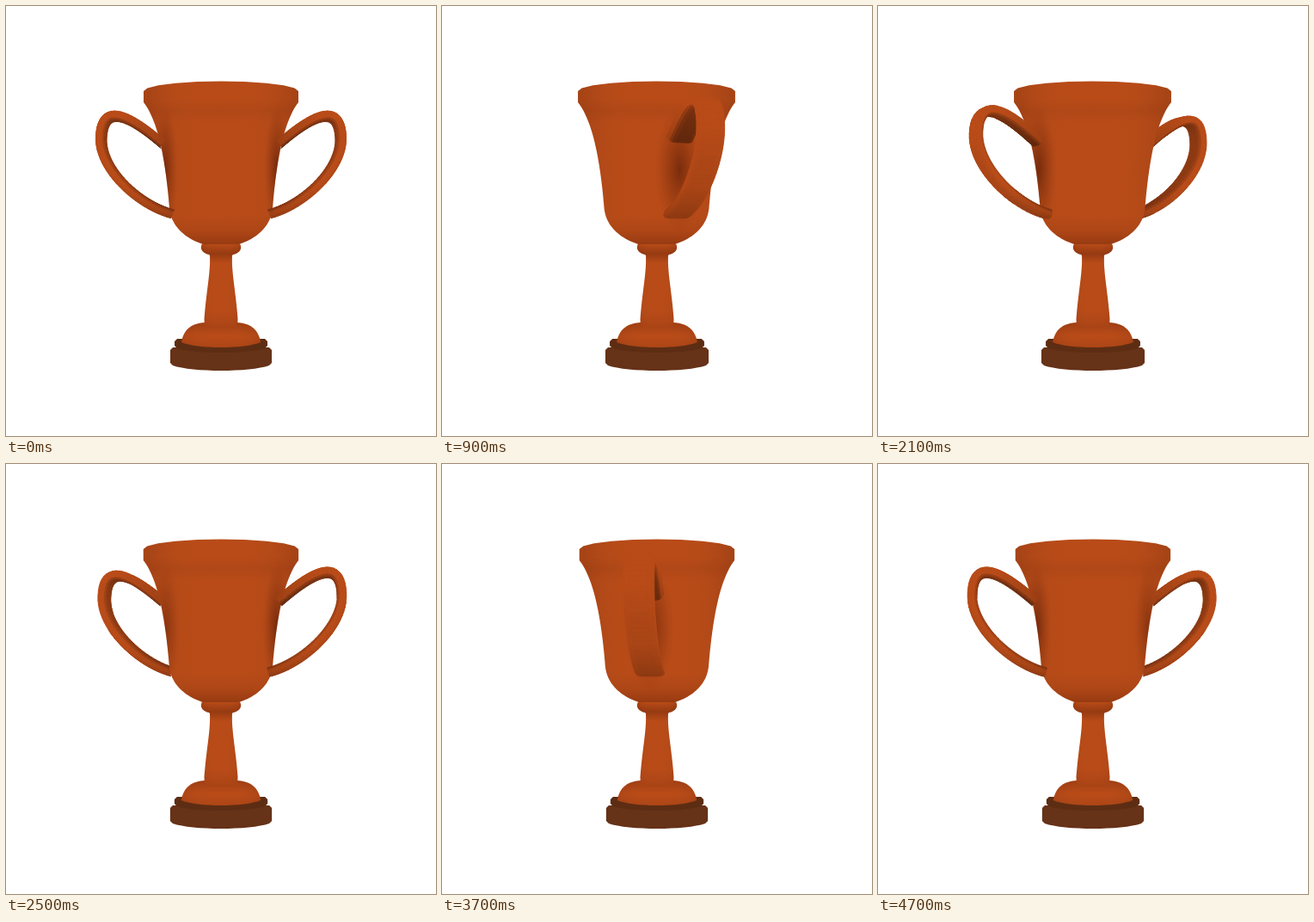
An HTML page with a canvas that plays this animation: 500 by 500 pixels, repeating every 4.8 s.

```html
<!DOCTYPE html>
<html lang="en">
<head>
<meta charset="utf-8">
<title>Rotating trophy</title>
<style>
  html, body { margin: 0; width: 100%; height: 100%; overflow: hidden; background: #fff; }
  canvas { display: block; width: 500px; height: 500px; }
</style>
</head>
<body>
<canvas id="stage" width="500" height="500"></canvas>
<script>
const ctx = document.getElementById('stage').getContext('2d');
const LOOP = 4800, STEP = 100, CENTER = 250, CAMERA = 980;
const ORANGE = [184, 75, 24];

const sample = (count, fn) => Array.from({ length: count + 1 }, (_, i) => fn(i / count));
const bezier = (a, b, c, d) => sample(24, t => [0, 1].map(k =>
  a[k] * (1 - t) ** 3 + 3 * b[k] * t * (1 - t) ** 2 + 3 * c[k] * t * t * (1 - t) + d[k] * t ** 3));

// Outlines as [distance from the axis, y], from top to bottom.
const RIM = sample(5, t => [90 * Math.sin(t * Math.PI / 2), 99 - 11.5 * Math.cos(t * Math.PI / 2)]);
const BOWL = [
  ...RIM,
  ...bezier([90, 112], [72, 135], [64, 185], [60, 235]),
  ...bezier([60, 235], [58, 256], [42, 270], [21, 277])
];
const STEM = [
  ...bezier([21, 276], [25, 279], [24, 287], [14, 289]),
  ...bezier([13, 290], [12, 310], [17, 330], [19.5, 364]),
  [19, 373]
];
const FOOT = bezier([19, 368], [36, 369], [44, 378], [46, 391]);
const HANDLE = [
  ...bezier([67, 161], [94, 138], [137, 105], [139, 153]),
  ...bezier([139, 153], [141, 190], [95, 232], [56, 242]).slice(1)
];

// Rounded handle cross-section as [across, outward], narrower on its inner side.
const SIDES = 12, HALF_WIDTH = 16, HALF_DEPTH = 5.2;
const rounded = (v, power) => Math.sign(v) * Math.abs(v) ** power;
const SECTION = sample(SIDES - 1, t => {
  const a = (t * (SIDES - 1) + .5) / SIDES * 2 * Math.PI, out = Math.sin(a);
  return [-HALF_WIDTH * (out < 0 ? .85 : 1) * rounded(Math.cos(a), .4), HALF_DEPTH * rounded(out, .6)];
});

const shade = tone => `rgb(${ORANGE.map(v => Math.round(v * tone)).join()})`;

function gradient(x0, y0, x1, y1, colors) {
  const g = ctx.createLinearGradient(x0, y0, x1, y1);
  colors.forEach((color, i) => g.addColorStop(i / (colors.length - 1), color));
  return g;
}

const across = (half, edge) => gradient(-half, 0, half, 0,
  sample(12, t => shade(1 - (1 - edge) * Math.abs(2 * t - 1) ** 4)));

const shadow = (top, bottom, ...alphas) =>
  gradient(0, top, 0, bottom, alphas.map(a => `rgba(60,14,0,${a})`));

function outline(profile, sag = 0) {
  const [x, y] = profile[profile.length - 1];
  ctx.beginPath();
  profile.forEach(([px, py]) => ctx.lineTo(-px, py));
  ctx.bezierCurveTo(-x * .6, y + sag * 1.33, x * .6, y + sag * 1.33, x, y);
  [...profile].reverse().forEach(([px, py]) => ctx.lineTo(px, py));
  ctx.closePath();
}

function fill(...paints) {
  for (const paint of paints) {
    ctx.fillStyle = paint;
    ctx.fill();
  }
}

function disc(half, top, bottom, sag, color) {
  outline([[half - 3, top], [half, top + 3], [half, bottom - 3], [half - 3, bottom]], sag);
  fill(color);
}

function project(x, y, z) {
  const s = CAMERA / (CAMERA - z);
  return [CENTER + x * s, CENTER + (y - CENTER) * s, z];
}

function handleRings(cos, sin) {
  return HANDLE.map(([r, y], i) => {
    const a = HANDLE[Math.max(0, i - 1)], b = HANDLE[Math.min(HANDLE.length - 1, i + 1)];
    const length = Math.hypot(b[0] - a[0], b[1] - a[1]);
    const nr = (b[1] - a[1]) / length, ny = (a[0] - b[0]) / length;
    const corners = SECTION.map(([t, n]) => {
      const radius = r + nr * n;
      return project(radius * cos - t * sin, y + ny * n, radius * sin + t * cos);
    });
    return { corners, ny };
  });
}

function drawHandle(angle) {
  const rings = handleRings(Math.cos(angle), Math.sin(angle));
  const faces = [], last = rings.length - 1;
  for (let i = 0; i < last; i++) {
    const nearBowl = Math.max(0, 1 - Math.min(i, last - i) / 12);
    for (let j = 0; j < SIDES; j++) {
      const k = (j + 1) % SIDES, from = rings[i].corners, to = rings[i + 1].corners;
      const quad = [from[j], from[k], to[k], to[j]], [a, b, c, d] = quad;
      const facing = (c[0] - a[0]) * (d[1] - b[1]) - (c[1] - a[1]) * (d[0] - b[0]);
      if (facing >= 0) continue;
      const out = Math.sin((j + 1) / SIDES * 2 * Math.PI);
      const inner = Math.max(0, -out), down = Math.max(0, out * rings[i].ny);
      faces.push({
        quad,
        depth: a[2] + b[2] + c[2] + d[2],
        color: shade(1 - .24 * inner - .12 * down - .14 * nearBowl)
      });
    }
  }
  faces.sort((p, q) => p.depth - q.depth);
  ctx.lineWidth = .9;
  ctx.lineJoin = 'round';
  for (const { quad, color } of faces) {
    ctx.beginPath();
    quad.forEach(([x, y]) => ctx.lineTo(x, y));
    ctx.closePath();
    ctx.fillStyle = ctx.strokeStyle = color;
    ctx.fill();
    ctx.stroke();
  }
}

// Soft shading on the bowl where a handle stands close to it.
function drawContact(angle) {
  const sin = Math.sin(angle);
  const strength = Math.min(1, Math.max(0, 1 + sin * 2.5)) * .5;
  if (!strength) return;
  ctx.save();
  ctx.translate(65 * Math.cos(angle) * (1 + .06 * sin), 190);
  ctx.scale(15 + 14 * Math.abs(sin), 74);
  const g = ctx.createRadialGradient(0, 0, 0, 0, 0, 1);
  sample(6, t => g.addColorStop(t, `rgba(60,14,0,${strength * (1 - t) ** 1.3})`));
  ctx.fillStyle = g;
  ctx.fillRect(-1, -1, 2, 2);
  ctx.restore();
}

function drawBody(angle) {
  // The body is slightly square in plan, so it looks wider on the diagonal.
  const diagonal = Math.sin(2 * angle) ** 2;
  ctx.save();
  ctx.translate(CENTER, 0);

  ctx.save();
  ctx.scale(1 + .035 * diagonal, 1);
  disc(59, 397, 418, 6, '#663218');
  disc(54, 387, 398, 5, '#5d2d13');
  outline(FOOT, 6);
  fill(across(46, .93), shadow(368, 382, .2, 0), shadow(386, 398, 0, .1));
  ctx.restore();

  outline(STEM);
  fill(across(23, .92), shadow(277, 299, 0, .28, 0), shadow(355, 373, 0, .1));

  ctx.save();
  ctx.translate(-diagonal, 0);
  ctx.scale(1 + .032 * diagonal, 1);
  outline(BOWL);
  fill(across(86, .9), shadow(108, 136, 0, .06, 0), shadow(244, 278, 0, .08, .28));
  ctx.clip();
  drawContact(angle);
  drawContact(angle + Math.PI);
  ctx.restore();

  ctx.restore();
}

function draw(time) {
  const angle = Math.floor(time % LOOP / STEP) * STEP / LOOP * 2 * Math.PI;
  const handles = [angle, angle + Math.PI];
  const inFront = a => Math.sin(a) > -1e-6;
  ctx.clearRect(0, 0, 500, 500);
  handles.filter(a => !inFront(a)).forEach(drawHandle);
  drawBody(angle);
  handles.filter(inFront).forEach(drawHandle);
}

const start = performance.now();
function tick() {
  draw(performance.now() - start);
  requestAnimationFrame(tick);
}
tick();
</script>
</body>
</html>
```
